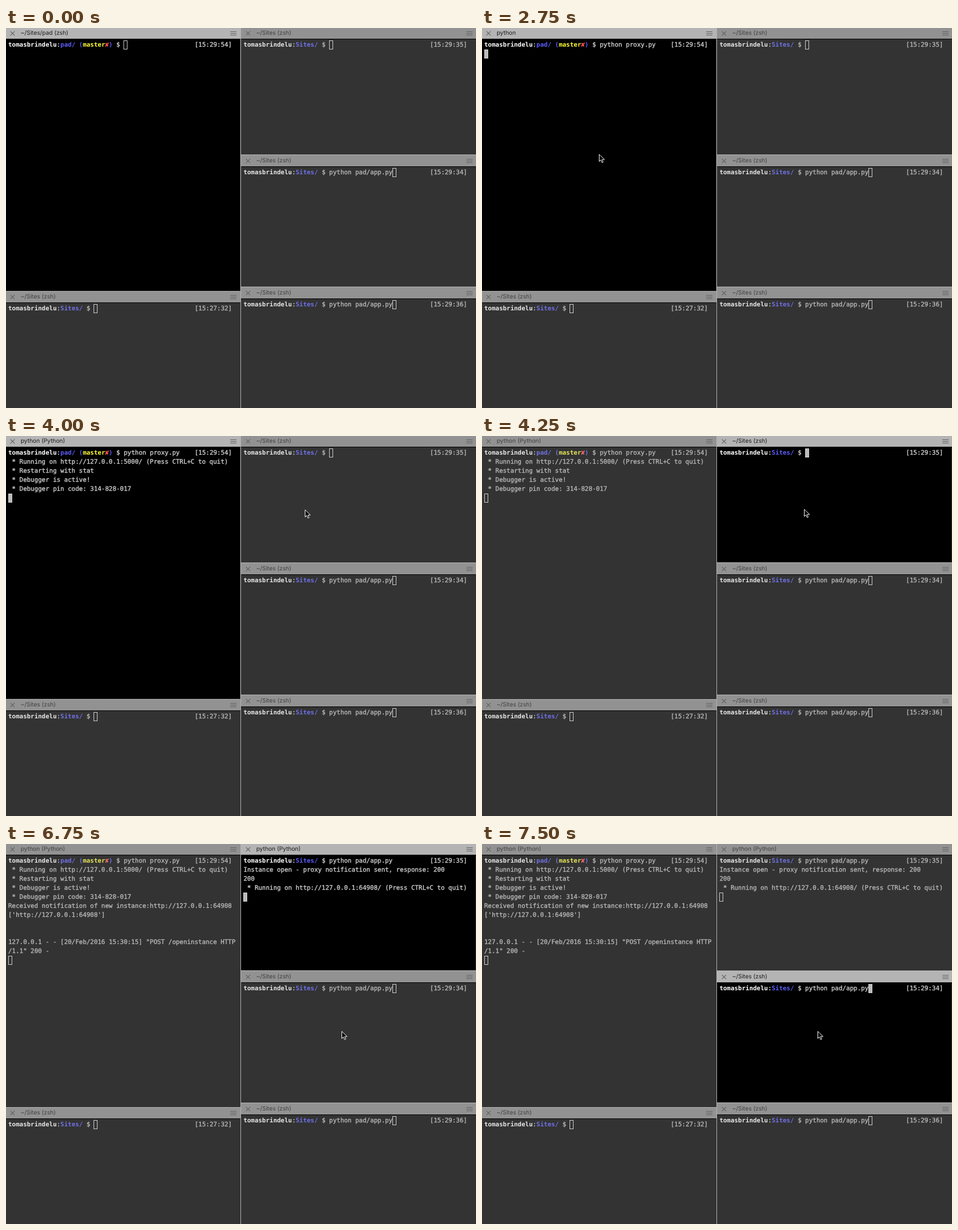
Write an HTML page that moves like this. It is 832 by 673 pixels and loops after 8000 ms.

```html
<!DOCTYPE html>
<html lang="en">
<head>
<meta charset="utf-8">
<title>Terminal panes</title>
<style>
html, body { margin: 0; width: 100%; height: 100%; overflow: hidden; background: #333; }
#stage { position: relative; width: 832px; height: 673px; overflow: hidden; text-rendering: geometricPrecision; }
#stage div, #pointer { position: absolute; }
.pane { background: #333; box-shadow: inset -1px -1px #333; color: #b8b8b8; --name: #e6e6e6; --blue: #7070e6; --yellow: #e4e45c; --red: #e46c6c; }
.pane.on { background: #000; color: #d0d0d0; --name: #fff; --blue: #5c5cff; --yellow: #ffff38; --red: #ff5050; }
.bar { left: 0; right: 0; background: #929292; color: #404040; border-bottom: 1px solid #000; }
.on .bar { background: #b4b4b4; color: #1c1c1c; }
.bar svg { position: absolute; bottom: 5px; fill: none; stroke: #606060; }
.title { bottom: 0; font: 10.3px/19px Inter, sans-serif; white-space: pre; }
.text { font: 10.963px/16px "DejaVu Sans Mono", monospace; white-space: pre; -webkit-text-stroke: .35px; }
.text b { color: var(--name); -webkit-text-stroke: 0; }
.text .blue { color: var(--blue); }
.text .yellow { color: var(--yellow); }
.text .red { color: var(--red); -webkit-text-stroke: .4px; }
.cursor { box-sizing: border-box; width: 7px; height: 16px; border: 1px solid #d0d0d0; }
.cursor.full { background: #bbb; }
.line { background: #b4b4b4; }
#pointer { left: 0; top: 0; overflow: visible; }
</style>
</head>
<body>
<div id="stage">
  <div id="panes"></div>
  <div class="line" style="left:415px;top:0;width:1px;height:673px"></div>
  <div class="line" style="left:0;top:466px;width:415px;height:1px"></div>
  <div class="line" style="left:416px;top:224px;width:416px;height:1px"></div>
  <div class="line" style="left:416px;top:458px;width:416px;height:1px"></div>
  <svg id="pointer" width="12" height="17"><path d="M.5 .9V13.4L3.4 10.7L5.4 15.4L7.5 14.5L5.5 10H9.8Z" fill="#000" stroke="#fff"/></svg>
</div>
<script>
const LOOP = 8000, CELL = 6.6, ROW = 16;
const USER = "tomasbrindelu";
const panesEl = document.getElementById("panes");
const pointerEl = document.getElementById("pointer");

const steps = [0, 750, 1500, 2750, 3000, 3500, 3750, 4000, 4250, 4750, 5750, 6000, 6500, 6750, 7000];

// time, x, y of the pointer tip
const pointerPath = [
  [750, 207, 223], [3500, 206, 224], [3750, 486, 137], [4000, 529, 130],
  [4250, 570, 129], [6500, 597, 220], [6750, 594, 331]
];

const proxyStart = [
  " * Running on http://127.0.0.1:5000/ (Press CTRL+C to quit)",
  " * Restarting with stat",
  " * Debugger is active!",
  " * Debugger pin code: 314-828-017"
];
const proxyNotice = [
  "Received notification of new instance:http://127.0.0.1:64908",
  "['http://127.0.0.1:64908']", "", "",
  "127.0.0.1 - - [20/Feb/2016 15:30:15] \"POST /openinstance HTTP",
  "/1.1\" 200 -"
];
const appStart = [
  "Instance open - proxy notification sent, response: 200",
  "200",
  " * Running on http://127.0.0.1:64908/ (Press CTRL+C to quit)"
];
const runApp = "python pad/app.py";

const shell = (time, cmd = "") => ({ title: "~/Sites (zsh)", time, cmd, out: [] });

function proxyPane(t) {
  return {
    title: t < 2750 ? "~/Sites/pad (zsh)" : t < 3500 ? "python" : "python (Python)",
    time: "15:29:54", repo: true, entered: t >= 2750,
    cmd: t < 1500 ? "" : "python proxy.py",
    out: t < 3000 ? [] : t < 6000 ? proxyStart : [...proxyStart, ...proxyNotice]
  };
}

function appPane(t) {
  return {
    title: t < 5750 ? "~/Sites (zsh)" : t < 6000 ? "python" : "python (Python)",
    time: "15:29:35", entered: t >= 5750,
    cmd: t < 4750 ? "" : runApp,
    out: t < 6000 ? [] : appStart
  };
}

// row: top of the first text line on the stage
const layout = [
  { x: 0, top: 0, end: 466, row: 22, state: proxyPane },
  { x: 416, top: 0, end: 224, row: 22, state: appPane },
  { x: 416, top: 225, end: 458, row: 248, state: () => shell("15:29:34", runApp) },
  { x: 416, top: 459, end: 673, row: 482, state: () => shell("15:29:36", runApp) },
  { x: 0, top: 467, end: 673, row: 489, state: () => shell("15:27:32") }
];

const box = (cls, css, html = "") => `<div class="${cls}" style="${css}">${html}</div>`;

function promptHtml(repo) {
  const place = repo
    ? '<b class="blue">pad/ (</b><b class="yellow">master</b><b class="red">✘</b><b class="blue">)</b>'
    : '<b class="blue">Sites/</b>';
  return `<b>${USER}</b>:${place} $ `;
}

function paneHtml(p, focused, t) {
  const s = p.state(t), right = p.x > 0;
  const width = right ? 416 : 415, shift = right ? 1 : 0;
  const textX = right ? 4.4 : 4, textY = p.row - p.top;
  const promptCols = USER.length + (s.repo ? 18 : 10);
  const col = s.entered ? 0 : promptCols + s.cmd.length;
  const line = s.entered ? s.out.length + 1 : 0;
  const full = focused && t >= 750 ? " full" : "";
  const bar = box("bar", `top:0;height:${textY - 3}px`,
    `<svg width="9" height="9" style="left:${7 + shift}px"><path d="M.8 .8L8.2 8.2M8.2 .8L.8 8.2" stroke-width="1.2"/></svg>` +
    `<svg width="11" height="9" style="left:${397 + shift * 2}px"><path d="M0 1.5H11M0 4.5H11M0 7.5H11"/></svg>` +
    box("title", `left:${26 + shift}px`, s.title));
  const text = [promptHtml(s.repo) + s.cmd, ...s.out].join("\n");
  return box("pane" + (focused ? " on" : ""),
    `left:${p.x}px;top:${p.top}px;width:${width}px;height:${p.end - p.top}px`,
    bar +
    box("text", `left:${textX}px;top:${textY}px`, text) +
    box("text", `left:${textX + 50 * CELL}px;top:${textY}px`, `[${s.time}]`) +
    box("cursor" + full, `left:${Math.floor(textX + col * CELL)}px;top:${textY + line * ROW}px`));
}

function draw(t) {
  const focus = t < 4250 ? 0 : t < 7000 ? 1 : 2;
  panesEl.innerHTML = layout.map((p, i) => paneHtml(p, i === focus, t)).join("");
  const at = pointerPath.filter(p => p[0] <= t).pop();
  pointerEl.style.display = at ? "" : "none";
  if (at) pointerEl.style.transform = `translate(${at[1]}px, ${at[2]}px)`;
}

const start = performance.now();
let shown = -1;
function tick() {
  const t = (performance.now() - start) % LOOP;
  const step = steps.filter(s => s <= t).pop();
  if (step !== shown) draw(shown = step);
  requestAnimationFrame(tick);
}
tick();
</script>
</body>
</html>
```
